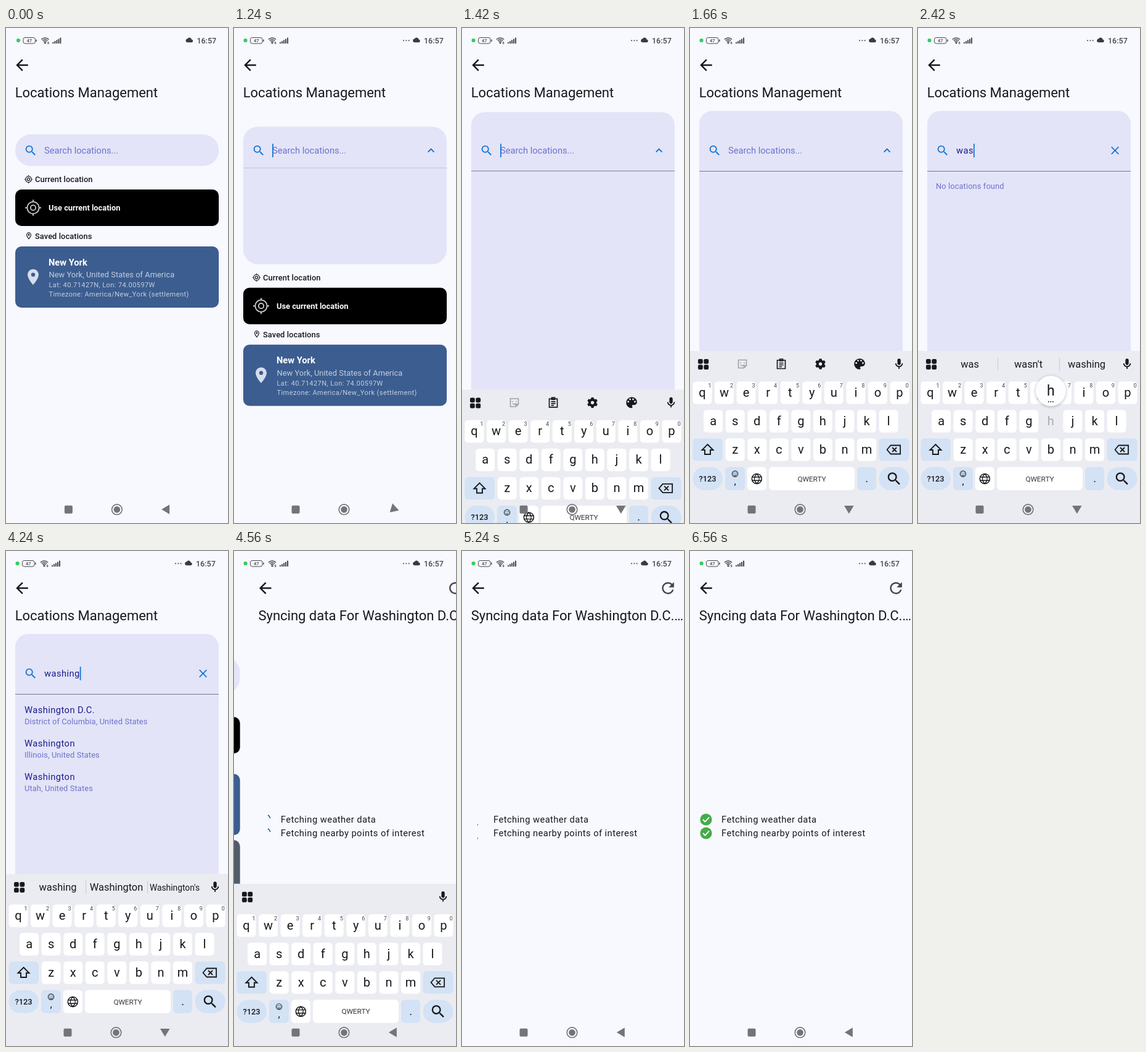
Animation of 360x800 px, one loop 6.62 s. Source, as an HTML page with a canvas:

```html
<!DOCTYPE html>
<html lang="en">
<head>
<meta charset="utf-8">
<title>Locations</title>
<style>
html, body { margin: 0; width: 100%; height: 100%; overflow: hidden; background: #f8f8ff; }
canvas { display: block; width: 360px; height: 800px; }
</style>
</head>
<body>
<canvas id="stage"></canvas>
<script>
const canvas = document.getElementById('stage');
const c = canvas.getContext('2d');
const dpr = window.devicePixelRatio || 1;
canvas.width = 360 * dpr;
canvas.height = 800 * dpr;

const LOOP = 6620, TAU = Math.PI * 2;
const BG = '#f8f8ff', PILL = '#e3e4f8', BLUE = '#1976d2', INK = '#17181d', HINT = '#6f71cb', GREY = '#747478';

const ICON = {
  back: 'M20 11H7.83l5.59-5.59L12 4l-8 8 8 8 1.41-1.41L7.83 13H20z',
  search: 'M15.5 14h-.79l-.28-.27A6.47 6.47 0 0 0 16 9.5 6.5 6.5 0 1 0 9.5 16c1.61 0 3.09-.59 4.23-1.57l.27.28v.79l5 4.99L20.49 19zm-6 0a4.5 4.5 0 1 1 0-9 4.5 4.5 0 0 1 0 9z',
  up: 'M12 8l-6 6 1.41 1.41L12 10.83l4.59 4.58L18 14z',
  close: 'M19 6.41L17.59 5 12 10.59 6.41 5 5 6.41 10.59 12 5 17.59 6.41 19 12 13.41 17.59 19 19 17.59 13.41 12z',
  pin: 'M12 2C8.13 2 5 5.13 5 9c0 5.25 7 13 7 13s7-7.75 7-13c0-3.87-3.13-7-7-7zm0 9.5a2.5 2.5 0 1 1 0-5 2.5 2.5 0 0 1 0 5z',
  pinLine: 'M12 2C8.13 2 5 5.13 5 9c0 5.25 7 13 7 13s7-7.75 7-13c0-3.87-3.13-7-7-7zM7 9a5 5 0 0 1 10 0c0 2.88-2.88 7.19-5 9.88C9.92 16.21 7 11.85 7 9zM9.5 9a2.5 2.5 0 1 0 5 0 2.5 2.5 0 0 0-5 0z',
  refresh: 'M17.65 6.35A7.96 7.96 0 0 0 12 4a8 8 0 1 0 7.73 10h-2.08A6 6 0 1 1 12 6c1.66 0 3.14.69 4.22 1.78L13 11h7V4z',
  mic: 'M12 14c1.66 0 3-1.34 3-3V5c0-1.66-1.34-3-3-3S9 3.34 9 5v6c0 1.66 1.34 3 3 3zm5-3c0 2.76-2.24 5-5 5s-5-2.24-5-5H5c0 3.53 2.61 6.43 6 6.92V21h2v-3.08c3.39-.49 6-3.39 6-6.92z',
  palette: 'M12 3a9 9 0 0 0 0 18c.83 0 1.5-.67 1.5-1.5 0-.39-.15-.74-.39-1.01-.23-.26-.38-.61-.38-.99 0-.83.67-1.5 1.5-1.5H16c2.76 0 5-2.24 5-5 0-4.42-4.03-8-9-8zm-5.5 9a1.5 1.5 0 1 1 0-3 1.5 1.5 0 0 1 0 3zm3-4a1.5 1.5 0 1 1 0-3 1.5 1.5 0 0 1 0 3zm5 0a1.5 1.5 0 1 1 0-3 1.5 1.5 0 0 1 0 3zm3 4a1.5 1.5 0 1 1 0-3 1.5 1.5 0 0 1 0 3z',
  cloud: 'M19.35 10.04A7.49 7.49 0 0 0 5.35 8.04 6 6 0 0 0 6 20h13a5 5 0 0 0 .35-9.96z'
};
for (const name in ICON) ICON[name] = new Path2D(ICON[name]);

// time of each keystroke, with the suggestions it brings up
const KEYS = [
  [1900, 'w', 'w', 'we', 'what'],
  [2110, 'a', 'wa', 'was', 'want'],
  [2270, 's', 'was', "wasn't", 'washing'],
  [2440, 'h', 'wash', 'washing', 'washed'],
  [2640, 'i', 'washi', 'washing', 'washin'],
  [2790, 'n', 'washin', 'washing', 'Washington'],
  [2950, 'g', 'washing', 'Washington', "Washington's"]
];
const OPEN = 1190, SEARCH_FROM = 3010, RESULTS = 3660, PICK = 4414, CLOSE = 4473;

const span = (t, start, length) => Math.min(1, Math.max(0, (t - start) / length));
const smooth = u => u * u * (3 - 2 * u);

// cubic-bezier(.2, 0, 0, 1)
function emphasized(x) {
  let lo = 0, hi = 1;
  for (let i = 0; i < 24; i++) {
    const u = (lo + hi) / 2;
    if (.6 * u * (1 - u) ** 2 + u ** 3 < x) lo = u; else hi = u;
  }
  return smooth(lo);
}

// cubic-bezier(0, 1, 0, 1), counted down from 1 to 0
const collapse = x => (1 - Math.cbrt(x)) ** 3;

function text(s, x, y, size, color, { weight = 400, gap = 0, align = 'left' } = {}) {
  c.font = `${weight} ${size}px Roboto, sans-serif`;
  c.letterSpacing = gap + 'px';
  c.textAlign = align;
  c.fillStyle = color;
  c.fillText(s, x, y);
}
function box(x, y, w, h, r, color) {
  c.beginPath();
  c.roundRect(x, y, w, h, r);
  c.fillStyle = color;
  c.fill();
}
function dot(x, y, r, color) {
  c.beginPath();
  c.arc(x, y, r, 0, TAU);
  c.fillStyle = color;
  c.fill();
}
function ring(x, y, r, w, color, from = 0, to = TAU) {
  c.beginPath();
  c.arc(x, y, r, from, to);
  c.lineWidth = w;
  c.strokeStyle = color;
  c.stroke();
}
function line(d, x, y, w, color) {
  c.save();
  c.translate(x, y);
  c.lineWidth = w;
  c.strokeStyle = color;
  c.stroke(new Path2D(d));
  c.restore();
}
function icon(name, x, y, scale, color) {
  c.save();
  c.translate(x, y);
  c.scale(scale, scale);
  c.translate(-12, -12);
  c.fillStyle = color;
  c.fill(ICON[name], 'evenodd');
  c.restore();
}
function shifted(x, y, draw) {
  c.save();
  c.translate(x, y);
  draw();
  c.restore();
}

function target(x, y, half, w, color) {
  const r = half * .74, tick = half - r;
  ring(x, y, r, w, color);
  ring(x, y, half * .32, w, color);
  line(`M0 ${-half}v${tick}M0 ${half}v${-tick}M${-half} 0h${tick}M${half} 0h${-tick}`, x, y, w, color);
}

// indeterminate progress: the head runs ahead, then the tail catches up
function spinner(t, x, y, r, w, color, start, angle) {
  const v = (t - start) / 780, n = Math.floor(v), u = v - n;
  const base = angle - 90 + .365 * (t - start) + 262 * n;
  const tail = base + 262 * smooth(Math.max(0, u * 2 - 1));
  const head = base + 8 + 262 * smooth(Math.min(1, u * 2));
  ring(x, y, r, w, color, tail * TAU / 360, head * TAU / 360);
}

function card(y, color, name, place, coords) {
  box(15, y, 330, 99, 10, color);
  icon('pin', 44, y + 49.5, 1.27, '#d6deec');
  text(name, 69, y + 30.5, 14.67, '#fff', { weight: 700 });
  text(place, 69.5, y + 50, 12.83, '#c3cee0', { gap: .05 });
  text(coords, 69.5, y + 66, 11, '#c3cee0', { gap: .43 });
  text('Timezone: America/New_York (settlement)', 69.5, y + 81, 11, '#c3cee0', { gap: .43 });
}

function divider(p) {
  c.globalAlpha = p;
  c.fillStyle = '#777887';
  c.fillRect(15, 223 + 8 * p, 330, 1);
  c.globalAlpha = 1;
}

function searchBar(t, p, typed) {
  box(15, 172 - 38 * p, 330, 51 + 518 * p, 25 - 4 * p, PILL);
  divider(p);
  icon('search', 40, 198, .93, BLUE);
  if (typed) text(typed, 62, 203, 14.67, '#1b1b8f', { gap: .46 });
  else text('Search locations...', 62, 203, 14.67, HINT);
  if (t < OPEN || t >= PICK) return;

  const lastKey = KEYS.filter(k => k[0] <= t).pop();
  const since = t - (lastKey ? lastKey[0] : OPEN);
  if (since % 600 < 300) {
    const x = typed ? 62 + c.measureText(typed).width : 62;
    c.fillStyle = BLUE;
    c.fillRect(x, 187, 1.8, 22);
  }
  icon(typed ? 'close' : 'up', 319.5, 198, .917, BLUE);
  if (!typed) return;
  if (t < SEARCH_FROM) text('No locations found', 29, 260, 12.83, HINT, { gap: .12 });
  else if (t < RESULTS) spinner(t, 180, 487, 20.5, 3.6, BLUE, 2970, -52);
  else ['District of Columbia, United States', 'Illinois, United States', 'Utah, United States'].forEach((place, i) => {
    text(i ? 'Washington' : 'Washington D.C.', 30, 262 + i * 54, 14.67, '#1b1b8f', { gap: .46 });
    text(place, 30, 280 + i * 54, 12.83, HINT, { gap: .12 });
  });
}

function listPage(t, p, typed) {
  icon('back', 26, 60, 1.22, INK);
  text('Locations Management', 14.67, 112, 22, INK);
  shifted(0, 480 * p, () => {
    target(36.5, 244.5, 6.5, 1.2, INK);
    text('Current location', 47, 249, 12.83, INK, { weight: 500, gap: .09 });
    box(15, 261, 330, 59, 10, '#000');
    target(44, 290.5, 13, 1.9, '#c8c8c8');
    text('Use current location', 69, 295, 12.83, '#fff', { weight: 700 });
    icon('pinLine', 37, 336, .57, INK);
    text('Saved locations', 47, 341, 12.83, INK, { weight: 500, gap: .09 });
    card(353, '#3c5d8f', 'New York', 'New York, United States of America', 'Lat: 40.71427N, Lon: 74.00597W');
    if (t >= PICK) card(460, '#535c69', 'Washington D.C.', 'District of Columbia, United States', 'Lat: 38.89511N, Lon: 77.03637W');
  });
  searchBar(t, p, typed);
}

function syncPage(t) {
  c.fillStyle = BG;
  c.fillRect(0, 0, 360, 800);
  icon('back', 26, 60, 1.22, INK);
  icon('refresh', 334, 60, 1.22, '#444449');
  text('Syncing data For Washington D.C.…', 14.67, 112, 22, INK);
  [['weather data', 434, 5950], ['nearby points of interest', 456, 6480]].forEach(([what, y, done]) => {
    text('Fetching ' + what, 51, y + 5.3, 14.67, INK, { gap: .46 });
    if (t < done) spinner(t, 26, y, 8.4, 1.8, '#23698f', 3690, 170);
    else {
      dot(26, y, 9.6, '#45ab49');
      line('M-5 0L-1.5 3.6L5 -3.6', 26, y, 1.9, '#fff');
    }
  });
}

function toolbar(t, words) {
  for (const x of [13, 22.4]) for (const y of [535, 544.2]) box(x, y, 7.8, 7.8, 2.2, INK);
  icon('mic', 339, 543, .88, INK);
  if (words) {
    words.forEach((word, i) => {
      text(word, [84, 179, 273.5][i], 549, word.length > 10 ? 13.8 : 16.4, INK, { align: 'center' });
    });
    c.fillStyle = '#c9cad0';
    c.fillRect(129, 533, 1, 21);
    c.fillRect(229, 533, 1, 21);
  } else if (t < PICK) {
    line('M-6.5 -6.5H6.5V2.5L2.5 6.5H-6.5ZM2.5 6.5V2.5H6.5M-3 -2.5v1.5M3 -2.5v1.5M-3 1.5Q0 4 3 1.5', 85, 543, 1.6, '#a0a1a6');
    line('M-6.5 -6H6.5V7.5H-6.5ZM-2.5 -8h5v3h-5ZM-3.5 -1.5H3.5M-3.5 1.5H3.5M-3.5 4.5H1', 148, 543, 1.7, INK);
    ring(211.5, 543, 4.7, 4, INK);
    for (let a = 0; a < 6; a++) {
      c.save();
      c.translate(211.5, 543);
      c.rotate(a * TAU / 6);
      box(-2.2, -8.5, 4.4, 4, 1, INK);
      c.restore();
    }
    icon('palette', 275, 543, .98, INK);
  }
}

function keyboard(t, words) {
  const panel = '#ebecf2', special = '#d3e2f5';
  box(0, 522, 360, 600, 0, panel);
  toolbar(t, words);
  const pressed = KEYS.find(k => Math.abs(t - k[0]) < 62);
  let popup = null;
  ['qwertyuiop', 'asdfghjkl', 'zxcvbnm'].forEach((row, r) => {
    [...row].forEach((letter, i) => {
      const x = [20, 37.6, 73.2][r] + i * 35.55, y = 589.5 + r * 46;
      const down = pressed && pressed[1] === letter;
      if (down) popup = { letter, x, y: y - 49 };
      else box(x - 15.5, y - 18.3, 31, 36.6, 5.5, '#fff');
      text(letter, x, y + 6.3, 20, down ? '#a9aab0' : INK, { align: 'center' });
      if (!r) text((i + 1) % 10, x + 12, y - 8.5, 9, '#44454b', { align: 'center' });
    });
  });
  box(4.5, 663.2, 48.5, 36.6, 6, special);
  line('M0 -8.5L9 .5H4.5V7.5H-4.5V.5H-9Z', 28.5, 681.5, 1.9, INK);
  box(306.5, 663.2, 49, 36.6, 6, special);
  line('M-11 0L-5 -7H10.5V7H-5ZM-2.5 -3.5L4.5 3.5M4.5 -3.5L-2.5 3.5', 330.5, 681.5, 1.8, INK);
  box(4.5, 709.5, 48.5, 37.5, 18.7, special);
  text('?123', 28.5, 733, 12.8, INK, { weight: 500, align: 'center' });
  box(57, 709.5, 32, 37.5, 6, special);
  ring(73, 720.5, 4.6, 1.1, INK);
  dot(71.3, 719.3, .8, INK);
  dot(74.7, 719.3, .8, INK);
  ring(73, 721, 2.3, 1, INK, .2, Math.PI - .2);
  text(',', 73, 738, 16, INK, { align: 'center' });
  box(92.8, 709.5, 31.2, 37.5, 6, '#fff');
  ring(108.3, 728.5, 8, 1.5, INK);
  line('M-8 -2.7H8M-8 2.7H8M0 -8C-5 -3 -5 3 0 8C5 3 5 -3 0 -8', 108.3, 728.5, 1.4, INK);
  box(128, 709.5, 139, 37.5, 6, '#fff');
  text('QWERTY', 197.5, 732.5, 11.8, '#34353a', { align: 'center' });
  box(271, 709.5, 31, 37.5, 6, special);
  text('.', 286.5, 734, 18, INK, { align: 'center' });
  box(306.5, 709.5, 49, 37.5, 18.7, special);
  icon('search', 331, 728.5, 1.15, INK);
  if (popup) {
    c.save();
    c.shadowColor = 'rgba(0,0,0,.28)';
    c.shadowBlur = 5 * dpr;
    c.shadowOffsetY = dpr;
    dot(popup.x, popup.y, 24.5, '#fdfdff');
    c.restore();
    text(popup.letter, popup.x, popup.y + 7.5, 23, INK, { align: 'center' });
    for (const dx of [-3.5, 0, 3.5]) dot(popup.x + dx, popup.y + 17.5, .9, INK);
  }
}

function navBar(turn) {
  box(93.5, 771.8, 13, 13, 2, GREY);
  ring(178.5, 778.2, 8.3, 1.6, GREY);
  dot(178.5, 778.2, 5.3, GREY);
  c.save();
  c.translate(257.8, 778);
  c.rotate(-turn * Math.PI / 2);
  c.fillStyle = GREY;
  c.fill(new Path2D('M-7 0L6 -7.8V7.8Z'));
  c.restore();
}

function statusBar(settled) {
  const tone = '#45464a';
  dot(18.6, 20, 3.1, '#2fd05f');
  c.beginPath();
  c.roundRect(26.5, 15.5, 19.5, 9.6, 3);
  c.lineWidth = 1;
  c.strokeStyle = tone;
  c.stroke();
  box(47.2, 18.5, 1.4, 3.6, .7, tone);
  text('47', 36.3, 23.1, 7.6, tone, { weight: 500, align: 'center' });
  for (const r of [3.5, 6.2, 9]) ring(62, 25, r, 1.4, tone, -TAU * .37, -TAU * .13);
  dot(62, 24.2, 1.4, tone);
  text('6', 65.5, 26, 5.5, tone, { weight: 700 });
  for (let i = 0; i < 5; i++) box(74 + i * 3, 22.8 - i * 1.8, 2, 2.4 + i * 1.8, .6, tone);
  if (settled) for (const x of [275, 279.3, 283.6]) dot(x, 20.2, 1, tone);
  icon('cloud', 296, 19.4, .49, '#3a3b40');
  text('16:57', 308, 25, 12.5, tone, { weight: 500 });
}

function draw(t) {
  c.setTransform(dpr, 0, 0, dpr, 0, 0);
  c.fillStyle = BG;
  c.fillRect(0, 0, 360, 800);

  const p = t < CLOSE ? emphasized(span(t, OPEN, 353)) : collapse(span(t, CLOSE, 206));
  const hits = t < PICK ? KEYS.filter(k => k[0] <= t) : [];
  const typed = hits.map(k => k[1]).join('');
  const words = hits.length ? hits.at(-1).slice(2) : null;
  const slide = 1 - (1 - span(t, PICK, 249)) ** 3;

  if (slide < 1) shifted(-360 * slide, 0, () => listPage(t, p, typed));
  if (slide > 0) shifted(360 * (1 - slide), 0, () => syncPage(t));

  const drop = t < 3000 ? (1 - span(t, 1280, 268)) ** 2 : span(t, 4500, 256) ** 2;
  if (drop < 1) shifted(0, 278 * drop, () => keyboard(t, words));

  const settled = t >= 300;
  shifted(settled ? 0 : 1.4, 0, () => {
    navBar(span(t, 1190, 110) - span(t, 4440, 110));
    statusBar(settled);
  });
}

const begin = performance.now();
function frame() {
  draw((performance.now() - begin) % LOOP);
  requestAnimationFrame(frame);
}
frame();
</script>
</body>
</html>
```
